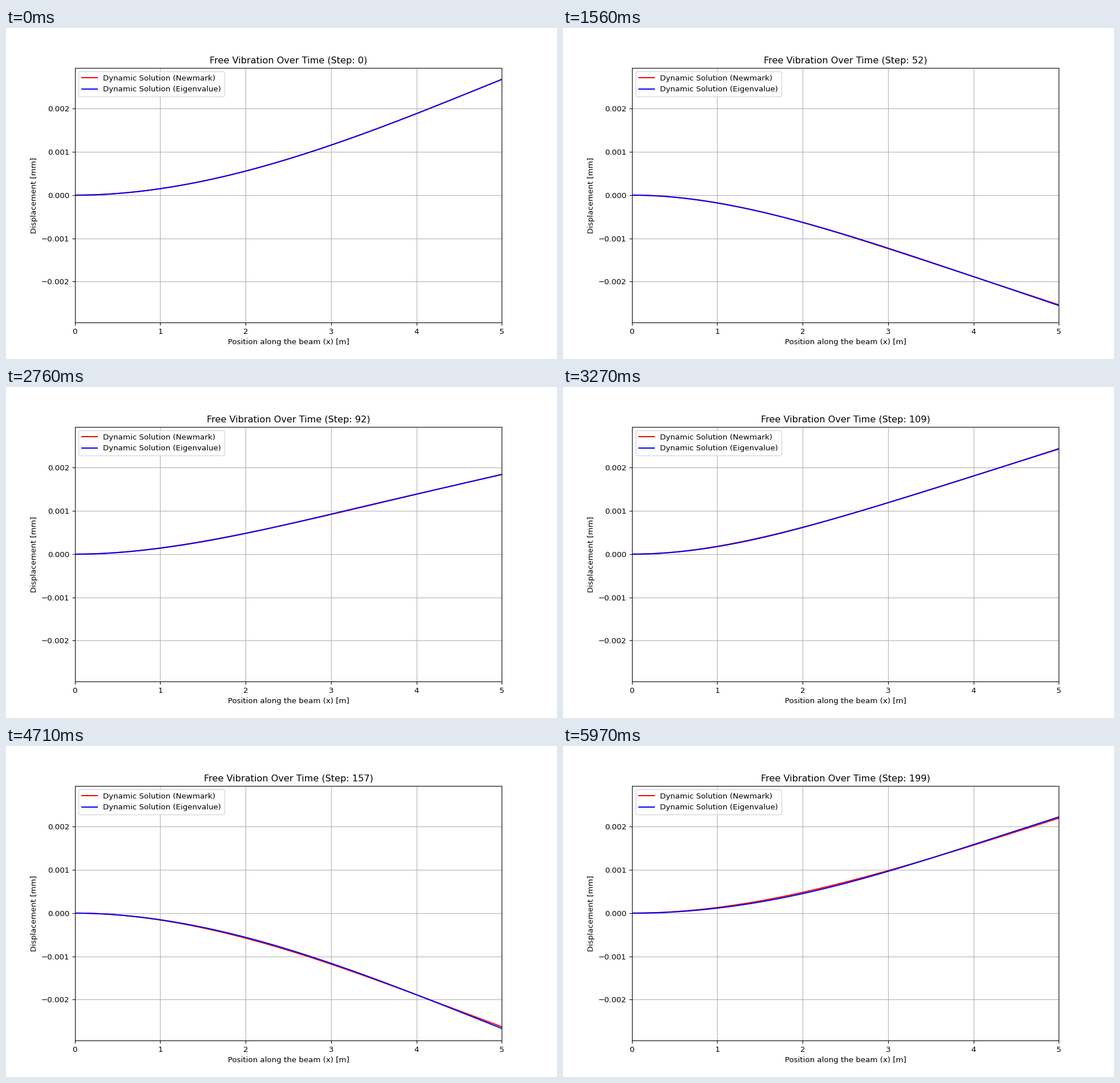
A matplotlib script that plays this animation: 966 by 580 pixels, repeating every 6 s.

```python
import numpy as np
import matplotlib.pyplot as plt
from matplotlib.animation import FuncAnimation

L = 5.0          # beam length
TIP = 0.00268    # static tip deflection before release
PERIOD = 104.33  # first natural period, in time steps
STEPS = 200

x = np.linspace(0, L, 101)
roots = np.array([1.875104069, 4.694091133, 7.854757438,
                  10.99554073, 14.13716839])


def mode_shape(lam):
    """Clamped-free bending mode, scaled to 1 at the tip."""
    s = lam * x / L
    ratio = (np.cosh(lam) + np.cos(lam)) / (np.sinh(lam) + np.sin(lam))
    phi = np.cosh(s) - np.cos(s) - ratio * (np.sinh(s) - np.sin(s))
    return phi / phi[-1]


# A tip load excites each mode by 12 / lambda^4
modes = np.array([12 * TIP / lam**4 * mode_shape(lam) for lam in roots])
omega = 2 * np.pi / PERIOD * (roots / roots[0])**2
omega_newmark = 2 * np.arctan(omega / 2)  # average acceleration, unit step


def deflection(freq, step):
    return np.cos(freq * step) @ modes


fig, ax = plt.subplots(figsize=(10, 6.0042), dpi=96.6)  # 966 x 580 px
newmark, = ax.plot(x, deflection(omega_newmark, 0), color="red",
                   label="Dynamic Solution (Newmark)")
eigen, = ax.plot(x, deflection(omega, 0), color="blue",
                 label="Dynamic Solution (Eigenvalue)")
ax.set_xlim(0, L)
ax.set_ylim(-1.1 * TIP, 1.1 * TIP)
ax.set_xlabel("Position along the beam (x) [m]")
ax.set_ylabel("Displacement [mm]")
ax.legend(loc="upper left")
ax.grid(True)


def update(step):
    newmark.set_ydata(deflection(omega_newmark, step))
    eigen.set_ydata(deflection(omega, step))
    ax.set_title(f"Free Vibration Over Time (Step: {step})")
    return newmark, eigen


anim = FuncAnimation(fig, update, frames=STEPS, interval=30,
                     repeat=True, repeat_delay=0)
plt.show()
```
